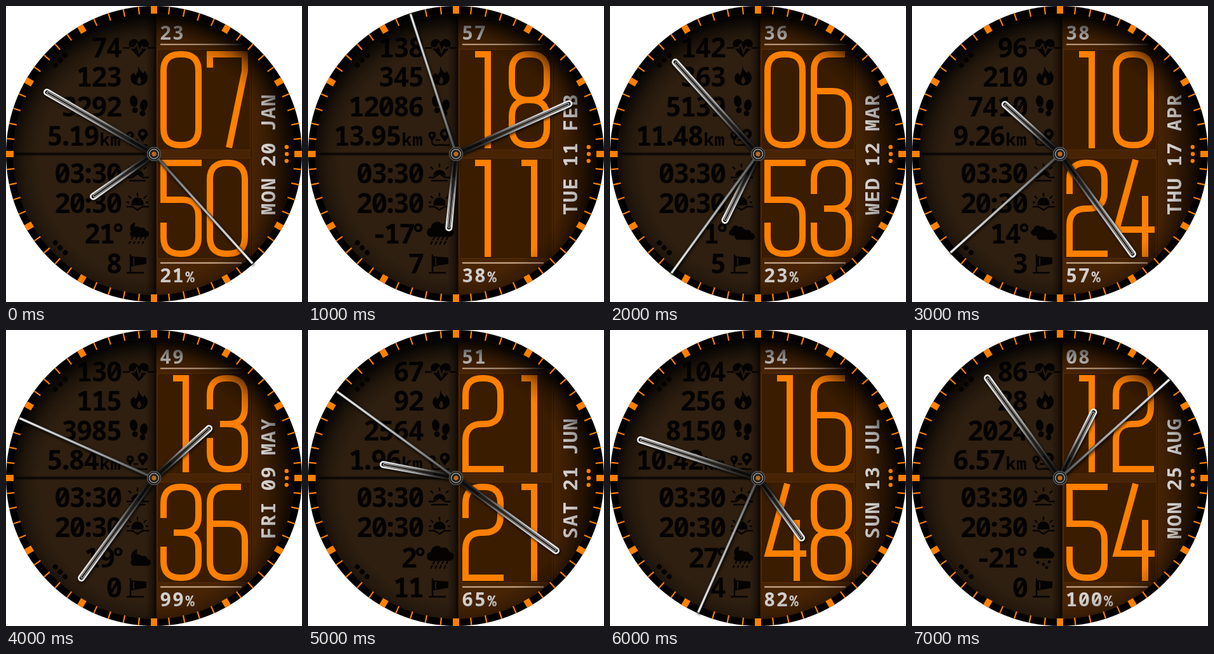
An HTML page that plays this animation: 466x466 px, repeating every 8000 ms.

```html
<!DOCTYPE html>
<html lang="en">
<head>
<meta charset="utf-8">
<title>Watch face</title>
<style>
html, body { margin: 0; width: 100%; height: 100%; overflow: hidden; background: #fff; }
svg { display: block; width: 466px; height: 466px; }
text { font-family: "Noto Sans Mono", "DejaVu Sans Mono", monospace; white-space: pre; }
.row { font-size: 43px; font-weight: 600; letter-spacing: -2.3px; text-anchor: end; fill: #050302; }
.row .unit { font-size: 27px; letter-spacing: .5px; }
.label { font-size: 30.5px; font-weight: 700; letter-spacing: 1.4px; word-spacing: -3px; fill: #d2d0ce; }
.label .unit { font-size: 24px; }
.ink { fill: #050302; }
.line { fill: none; stroke: #050302; stroke-width: 2.4; }
.big { fill: none; stroke: #ff8000; stroke-width: 10; }
.hand { filter: drop-shadow(1px 2px 2px rgba(0,0,0,.85)); }
</style>
</head>
<body>
<svg viewBox="0 0 466 466">
  <defs>
    <clipPath id="dial"><circle cx="233" cy="233" r="222"/></clipPath>
    <linearGradient id="right">
      <stop offset="0" stop-color="#482405"/><stop offset=".65" stop-color="#482405"/>
      <stop offset=".92" stop-color="#231102"/><stop offset="1" stop-color="#140a01"/>
    </linearGradient>
    <radialGradient id="shade" gradientUnits="userSpaceOnUse" cx="233" cy="248" r="232">
      <stop offset=".78" stop-opacity="0"/><stop offset=".87" stop-opacity=".2"/>
      <stop offset=".92" stop-opacity=".42"/><stop offset="1" stop-opacity=".88"/>
    </radialGradient>
    <linearGradient id="edge">
      <stop offset="0" stop-opacity="0"/><stop offset=".7" stop-opacity=".4"/><stop offset="1" stop-opacity=".85"/>
    </linearGradient>
    <linearGradient id="groove" x2="0" y2="1">
      <stop offset="0" stop-opacity="0"/><stop offset=".5" stop-opacity=".9"/><stop offset="1" stop-opacity="0"/>
    </linearGradient>
    <linearGradient id="steel" x2="0" y2="1">
      <stop offset="0" stop-color="#f0f0f0"/><stop offset=".5" stop-color="#a4a4a4"/>
      <stop offset=".78" stop-color="#3c3c3c"/><stop offset="1" stop-color="#141414"/>
    </linearGradient>
    <linearGradient id="needle" x2="0" y2="1">
      <stop offset="0" stop-color="#ededed"/><stop offset=".6" stop-color="#a4a4a4"/><stop offset="1" stop-color="#484848"/>
    </linearGradient>
    <path id="cloud" d="M-11 8a6 6 0 0 1-1-12a8 8 0 0 1 14-5a7 7 0 0 1 10 5a6 6 0 0 1 0 12z"/>
    <path id="moon" d="M2-12A12 12 0 1 0 14 6A13 13 0 0 1 2-12Z"/>
  </defs>

  <circle cx="233" cy="233" r="233"/>
  <g clip-path="url(#dial)">
    <rect width="234" height="466" fill="#2e1f10"/>
    <rect x="234" width="232" height="466" fill="url(#right)"/>
    <rect x="220" width="16" height="466" fill="url(#edge)"/>
    <rect y="229.500" width="234" height="7" fill="url(#groove)"/>
    <g fill="#3a1c00" stroke="#5c2f06" stroke-opacity=".8">
      <rect x="238.500" y="68.500" width="146" height="158"/>
      <rect x="238.500" y="239.500" width="146" height="158"/>
    </g>
    <path d="M236.500 0V466M386 60V406" stroke="#000" stroke-opacity=".45"/>

    <path d="M243 60.500H371M243 404.500H371" stroke="#d6b598" stroke-width="1.800"/>
    <g id="icons">
      <path class="ink" d="M209 81L195 66Q191 58 196 54Q203 49 209 57Q215 49 222 54Q227 58 223 66Z"/>
      <path d="M193 66H202L206 60L210 73L214 64L216 66H225" fill="none" stroke="#291b0e" stroke-width="2.500"/>
      <path class="line" d="M184 66H195M223 66H234"/>
      <path class="ink" fill-rule="evenodd" d="M208 94Q210 101 216 106L218 102Q224 109 223 115Q221 125 209 125Q197 124 196 114Q196 108 201 105L204 109Q209 103 208 94ZM210 123Q216 119 210 111Q203 120 210 123Z"/>
      <g class="ink">
        <ellipse cx="201" cy="150" rx="6" ry="9" transform="rotate(-8 201 150)"/>
        <circle cx="203" cy="164" r="4.500"/>
        <ellipse cx="217" cy="156" rx="6" ry="9" transform="rotate(8 217 156)"/>
        <circle cx="215" cy="169" r="4.500"/>
      </g>
      <path class="ink" fill-rule="evenodd" d="M215 214L208 204A8 8 0 1 1 223 204ZM215 198a3 3 0 1 0 .1 0ZM195 213L190 206A6 6 0 1 1 201 206ZM195 201a2 2 0 1 0 .1 0Z"/>
      <path class="line" d="M195 213Q195 220 203 219T215 219H223M201 211H208"/>
      <path class="ink" d="M197 268a10 10 0 0 1 20 0l-10-5z"/>
      <path class="line" d="M190 270H198L207 264L216 270H225M194 275H220M207 248V254M193 253L197 257M221 253L217 257"/>
      <path class="ink" d="M198 314a9.500 9.500 0 1 1 18 0z"/>
      <path class="line" d="M190 316H199L207 321L215 316H225M207 294V300M193 299L197 303M221 299L217 303M190 309H194M220 309H224"/>
      <path class="line" d="M196 391V421M190 420H217"/>
      <path class="ink" d="M197 394L221 396V406L197 410Z"/>
      <path d="M201 396V408" stroke="#291b0e" stroke-width="2"/>
    </g>
    <g id="weather"></g>
    <g id="rows"></g>
    <g id="big" class="big"></g>
    <text id="sec" class="label" x="242" y="53"></text>
    <text id="power" class="label" x="242" y="435"></text>
    <text id="date" class="label" transform="translate(424 138)rotate(-90)" text-anchor="end"></text>
    <rect width="466" height="466" fill="url(#shade)"/>
  </g>
  <g id="ticks" fill="#ff8000"></g>
  <g id="dots"></g>

  <g class="hand"><g id="hourHand"></g></g>
  <g class="hand"><g id="minuteHand"></g></g>
  <g class="hand"><g id="secondHand"><path d="M-2 0V-232H2V0Z" fill="url(#needle)" stroke="#2a2a2a" stroke-width=".8"/></g></g>
  <g fill="none" stroke-width="1.500">
    <circle cx="233" cy="233" r="10.500" fill="#111" stroke="#555"/>
    <circle cx="233" cy="233" r="7.500" fill="#222" stroke="#999"/>
    <circle cx="233" cy="233" r="4.500" fill="#b9681c" stroke="#1a1a1a"/>
  </g>
</svg>
<script>
const $ = id => document.getElementById(id);
const STEP = 1000;

// time, date, pulse, energy, steps, distance, temperature, wind, battery, sky
const states = [
  ['07:50:23', 'MON 20 JAN', 74, 123, 3292, '5.19', 21, 8, 21, 'showers'],
  ['18:11:57', 'TUE 11 FEB', 138, 345, 12086, '13.95', -17, 7, 38, 'rain'],
  ['06:53:36', 'WED 12 MAR', 142, 363, 5139, '11.48', 1, 5, 23, 'clouds'],
  ['10:24:38', 'THU 17 APR', 96, 210, 7410, '9.26', 14, 3, 57, 'clouds'],
  ['13:36:49', 'FRI 09 MAY', 130, 115, 3985, '5.84', 19, 0, 99, 'night'],
  ['21:21:51', 'SAT 21 JUN', 67, 92, 2564, '1.96', 2, 11, 65, 'rain'],
  ['16:48:34', 'SUN 13 JUL', 104, 256, 8150, '10.42', 27, 4, 82, 'showers'],
  ['12:54:08', 'MON 25 AUG', 86, 28, 2024, '6.57', -21, 0, 100, 'snow']
];

// Stroke shapes of the large numerals
const cap = 'Q0 0 26 0H29Q55 0 55 26';
const bowl = 'V117Q55 143 29 143H26Q0 143 0 117';
const numerals = {
  0: `M0 26${cap}${bowl}Z`,
  1: 'M15 0H35V148',
  2: `M0 49V26${cap}V46Q55 72 29 72H26Q0 72 0 98V143H60`,
  3: `M0 49V26${cap}V46Q55 72 29 72H16M29 72Q55 72 55 98${bowl}V94`,
  4: 'M31 -5L1 105H61M46 52V148',
  5: `M60 0H0V58H29Q55 58 55 84${bowl}V94`,
  6: `M49 0H26Q0 0 0 26V117Q0 143 26 143H29Q55 143 55 117V84Q55 58 29 58H0`,
  7: 'M0 21V0H55V26L30 147',
  8: `M0 26${cap}V46Q55 72 29 72H26Q0 72 0 46ZM26 72H29Q55 72 55 98${bowl}V98Q0 72 26 72`
};

const put = (id, x, y, s) => `<use href="#${id}" class="ink" transform="translate(${x} ${y})scale(${s})"/>`;
const fall = (dash, w) => `<path class="line" stroke-dasharray="${dash}" stroke-linecap="round" style="stroke-width:${w}"
  d="M199 364L193 376M206 364L200 376M213 364L207 376M220 364L214 376"/>`;
const skies = {
  rain: put('cloud', 208, 354, 1.2) + fall('4 4', 2.4),
  showers: put('moon', 202, 350, .8) + put('cloud', 210, 357, .85) + fall('3 5', 2.2),
  clouds: put('cloud', 201, 355, .8) + put('cloud', 212, 361, .9),
  night: put('moon', 205, 357, 1) + put('cloud', 212, 364, .9),
  snow: put('cloud', 207, 352, .95) + [[198, 366], [207, 369], [216, 365], [212, 374]]
    .map(([x, y]) => `<circle class="ink" cx="${x}" cy="${y}" r="2.5"/>`).join('')
};

// Punctuation takes less room than a digit
const tight = s => s.replace(/[.:°-]/g, c => {
  const cut = c === '-' ? 3.2 : 6.2;
  return `<tspan dx="${-cut}" style="letter-spacing:${-cut - 2.3}px">${c}</tspan>`;
});

const hand = (r, slot) => `
  <path d="M-3.5 -8L-4.2 ${5.5 - r}a4.2 4.2 0 0 1 8.4 0L3.5 -8Z" fill="#0e0c0a" stroke="url(#steel)" stroke-width="2.8"/>
  <path d="M-1.6 ${-slot}V${7 - r}a1.6 1.6 0 0 1 3.2 0V${-slot}a1.6 1.6 0 0 1 -3.2 0Z" fill="#211a14" stroke="url(#steel)" stroke-width=".9"/>`;

function build() {
  let ticks = '', dots = '';
  for (let i = 0; i < 60; i++) {
    const w = i % 5 ? 2.2 : 10;
    ticks += `<rect x="${233 - w / 2}" y="0" width="${w}" height="12" transform="rotate(${i * 6} 233 233)"/>`;
  }
  for (const a of [90, 225, 315]) for (const d of [-3, 0, 3])
    dots += `<circle cx="233" cy="24" r="${a === 90 ? 3.2 : 4}" fill="${a === 90 ? '#ff8000' : '#050302'}" transform="rotate(${a + d} 233 233)"/>`;
  $('ticks').innerHTML = ticks;
  $('dots').innerHTML = dots;
  $('hourHand').innerHTML = hand(122, 38);
  $('minuteHand').innerHTML = hand(200, 45);
}

const turn = (id, deg) => $(id).setAttribute('transform', `translate(233 233)rotate(${deg})`);

function show([time, date, pulse, energy, steps, km, temp, wind, battery, sky]) {
  const [h, m, s] = time.split(':');
  const values = [pulse, energy, steps, km, '03:30', '20:30', temp + '°', wind].map(v => tight(String(v)));
  values[3] += '<tspan class="unit" dx="2">km</tspan>';
  const base = [81, 127, 174, 220, 279, 326, 374, 421];
  $('rows').innerHTML = values.map((v, i) => `<text class="row" x="181" y="${base[i]}">${v}</text>`).join('');
  $('big').innerHTML = [...h + m].map((c, i) =>
    `<path d="${numerals[c]}" transform="translate(${i % 2 ? 321 : 248} ${i < 2 ? 76 : 247})"/>`).join('');
  $('weather').innerHTML = skies[sky];
  $('sec').textContent = s;
  $('date').textContent = date;
  $('power').innerHTML = `${battery}<tspan class="unit" dx="1">%</tspan>`;
  turn('hourHand', h % 12 * 30 + m / 2);
  turn('minuteHand', m * 6);
  turn('secondHand', s * 6);
}

let shown = -1;
function tick() {
  const i = Math.floor(performance.now() / STEP) % states.length;
  if (i !== shown) show(states[shown = i]);
  requestAnimationFrame(tick);
}
build();
tick();
</script>
</body>
</html>
```
